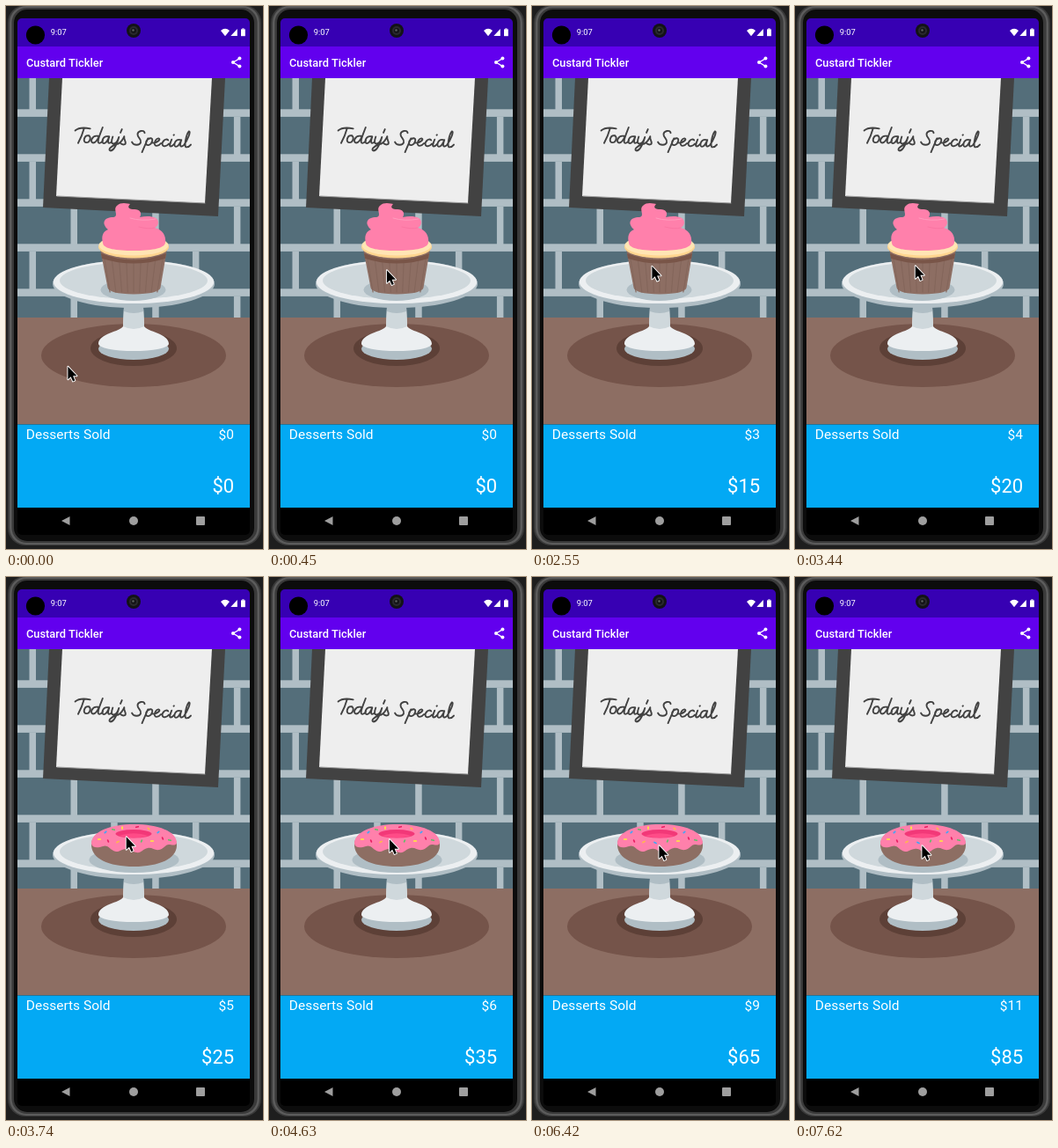
Write an HTML page with a canvas that moves like this. It is 292 px wide and 617 px high and loops after 8 s.

```html
<!DOCTYPE html>
<html lang="en">
<head>
<meta charset="utf-8">
<title>Custard Tickler</title>
<style>
html, body { margin: 0; width: 100%; height: 100%; overflow: hidden; background: #1b1b1b; }
canvas { display: block; width: 292px; height: 617px; }
</style>
</head>
<body>
<canvas id="stage" role="img" aria-label="Phone app: tap the dessert to sell it. Sign: Today's Special"></canvas>
<script>
const W = 292, H = 617, LOOP = 8000;
const canvas = document.getElementById('stage');
const ctx = canvas.getContext('2d');
const ratio = window.devicePixelRatio || 1;
canvas.width = Math.round(W * ratio);
canvas.height = Math.round(H * ratio);

// [time, x, y]
const moves = [
  [0, 69.5, 408.5], [150, 103.5, 322], [300, 130, 304], [450, 133, 299],
  [1350, 135.5, 294.6], [3440, 135.8, 294], [4180, 136, 296],
  [4330, 136, 297], [4780, 137, 298], [4920, 143.5, 304]
];
const sales = [900, 1800, 2550, 3000, 3740, 4630, 5220, 5820, 6420, 7020, 7620];
const DONUT_AT = 5;

function rect(x, y, w, h, color) {
  ctx.fillStyle = color;
  ctx.fillRect(x, y, w, h);
}
function oval(x, y, rx, ry, color) {
  ctx.fillStyle = color;
  ctx.beginPath();
  ctx.ellipse(x, y, rx, ry, 0, 0, Math.PI * 2);
  ctx.fill();
}
function shape(d, color) {
  ctx.fillStyle = color;
  ctx.fill(new Path2D(d));
}
function line(d, color, width) {
  ctx.strokeStyle = color;
  ctx.lineWidth = width;
  ctx.lineCap = ctx.lineJoin = 'round';
  ctx.stroke(new Path2D(d));
}
function round(x, y, w, h, r, color) {
  ctx.fillStyle = color;
  ctx.beginPath();
  ctx.roundRect(x, y, w, h, r);
  ctx.fill();
}
function text(str, x, y, size, align = 'left', weight = 400) {
  ctx.font = `${weight} ${size}px Roboto, Arial, sans-serif`;
  ctx.textAlign = align;
  ctx.fillStyle = '#fff';
  ctx.fillText(str, x, y);
}

function phone() {
  rect(0, 0, W, H, '#1e1e1e');
  round(2, -1, 288, 614, 20, '#3a3a3a');
  round(4, 0, 284, 612, 19, '#5c5c5c');
  round(6.5, 2, 279, 608, 17, '#3a3a3a');
  round(9, 4, 273, 604, 15, '#0c0c0c');
}

function bars() {
  rect(13, 14, 264, 32, '#3700b3');
  rect(13, 46, 264, 36, '#6200ee');
  oval(33.5, 33, 10.6, 10.6, '#000');
  oval(145, 28, 8, 8, '#131316');
  oval(145, 28, 5, 5, '#2a2a2e');
  oval(145, 28, 3, 3, '#141418');
  oval(144.5, 27.5, 1.2, 1.2, '#5d6360');
  text('9:07', 50.8, 33, 9.3);
  shape('M244 28 Q249 23.5 254 28 L249 34.2Z', '#fff');
  shape('M255.3 34 L262.8 34 L262.8 26Z', '#fff');
  rect(267, 26.4, 4.8, 7.8, '#fff');
  rect(268.3, 25.4, 2.2, 1.2, '#fff');
  text('Custard Tickler', 23, 69, 12.8, 'left', 500);
  line('M265.5 59.6 L258 64 L265.5 68.6', '#fff', 1.3);
  for (const [x, y] of [[265.4, 59.6], [258, 64], [265.4, 68.6]]) oval(x, y, 2, 2, '#fff');
}

function wall() {
  rect(13, 82, 264, 272, '#546e7a');
  for (let row = 0; row < 6; row++) {
    const top = 75 + row * 51;
    rect(13, top + 42.3, 264, 8.6, '#b0bec5');
    for (let x = row % 2 ? 73.5 : 26.5; x < 277; x += 92.7) rect(x, top, 7.5, 43, '#b0bec5');
  }
}

function sign() {
  shape('M49 82 H249 L241 239 L42 229Z', '#424242');
  shape('M64 82 H234 L226 224 L57 216Z', '#eee');
  line('M58 216 L226 224', '#9e9e9e', 1);
  ctx.save();
  ctx.translate(77, 154.5);
  ctx.rotate(0.046);
  const letters = [
    'M1 -13 Q6 -18 18 -16 M11 -16 Q9 -7 5 1',
    'M17 -8 C11 -9 10 0 14 0 C19 0 20 -8 16 -8',
    'M27 -8 C20 -9 18 0 22 0 C25 0 27 -4 29 -9 L32 -18 M30 -12 C27 -3 27 0 29 0 Q31 0 33 -3',
    'M39 -8 C32 -9 31 0 34 0 C37 0 39 -5 40 -8 C38 -1 39 1 43 -2',
    'M44 -8 C42 -2 43 0 45 0 C48 0 50 -4 51 -8 C49 0 46 8 42 8 C39 7 42 3 49 0',
    'M54 -17 L52.5 -13',
    'M50 0 Q55 -3 57 -9 C56 -5 61 -2 58 0 Q55 1 53 -1',
    'M80 -14 C79 -18 72 -16 72 -12 C72 -8 77 -7 76 -3 C75 1 68 1 66 -3',
    'M84 -8 L78 8 M82 -4 C84 -9 90 -10 89 -5 C88 0 83 1 82 -2',
    'M90 -3 C96 -4 99 -8 96 -8.5 C92 -8 90 0 94 0 Q97 0 99 -3',
    'M107 -7 C104 -10 99 -4 101 -1 C102 1 106 0 108 -3',
    'M111 -8 Q108 0 110 0 Q112 0 114 -3 M113 -13 l.4 -.4',
    'M121 -8 C114 -9 113 0 116 0 C119 0 121 -5 122 -8 C120 -1 121 1 125 -2',
    'M125 -2 C129 -8 133 -19 130 -18 C127 -14 125 0 128 0 Q131 0 133 -3'
  ];
  line(letters.join(' '), '#424242', 1.9);
  ctx.restore();
}

function stand() {
  rect(13, 354, 264, 121.5, '#8d6e63');
  oval(145, 397, 105, 36, '#75544a');
  oval(145, 389, 49, 20, '#5d4037');
  oval(145, 389.5, 40, 12.5, '#b0bec5');
  shape('M134 342 H156 L157 364 C160 370 185 372 185 384 A40 8 0 0 1 105 384 C105 372 130 370 133 364Z', '#eceff1');
  shape('M134 342 H156 L157 364 Q145 370 133 364Z', '#cfd8dc');
  shape('M134 340 H156 V347 Q145 351 134 347Z', '#b0bec5');
  oval(145, 315.7, 92, 27.3, '#b0bec5');
  oval(145, 313.5, 91.2, 24.6, '#eceff1');
  oval(145, 312, 84, 20.8, '#cfd8dc');
}

function cupcake() {
  oval(144.5, 322.5, 37, 12.5, '#b0bec5');
  shape('M107 276 H183 L175.5 320 Q174 327 145 327.5 Q117 327 115.5 320Z', '#8d6e63');
  for (let i = 0; i < 9; i++) {
    const x = (i - 4) * 8.4;
    line(`M${145 + x} 284 L${145 + x * .8} 325`, '#84665b', 1.2);
  }
  shape('M108 281 Q145 296 182 281 L181 287 Q145 298 109 287Z', '#795548');
  oval(145, 274, 40, 12.5, '#ffd58f');
  oval(145, 272, 39.5, 11.5, '#ffe5b4');
  shape('M110 269 C108 262 110 256 116 254 C108 247 111 240 122 240 ' +
    'C129 239 121 231 126 227 C131 222 139 225 141 225 C137 229 140 231 146 231 ' +
    'C152 231 155 235 152 240 C162 238 173 239 173 246 C173 249 171 251 169 252 ' +
    'C178 254 182 261 181 269 C180 276 163 278 145 278 C126 278 110 276 110 269Z', '#ff80ab');
  line('M141 241 Q154 245 170 242', '#ff9dbe', 1);
  line('M151 251 Q162 254 169 252', '#f973a0', .8);
}

function donut() {
  oval(145.5, 321.5, 51, 14.5, '#b0bec5');
  shape('M97 304 C97 289 119 282 145.5 282 C173 282 194 289 194 305 ' +
    'C194 320 174 329 145.5 329 C116 329 97 320 97 304Z', '#8d6e63');
  shape('M97 303 C97 289 119 281 145.5 281 C173 281 194 289 194 302 ' +
    'C193 306 188 304 185 304 C181 304 179 309 174 310 C169 311 166 307 161 308 ' +
    'C155 309 154 314 148 313 C142 312 142 308 136 309 C129 310 128 314 122 311 ' +
    'C117 308 115 304 110 306 C104 308 98 308 97 303Z', '#ff80ab');
  oval(145, 291.8, 20.5, 4.8, '#f23878');
  shape('M128 294 Q145 288.5 162 294 Q146 298.5 128 294Z', '#ff4b87');
  const dots = [
    [106, 298], [113, 290], [116, 300], [122, 287], [127, 301], [132, 285], [140, 302],
    [149, 284], [154, 300], [162, 286], [166, 300], [173, 290], [178, 297], [186, 299]
  ];
  const colors = ['#ffeb3b', '#42a5f5', '#e91e63', '#66bb6a', '#ffb74d'];
  dots.forEach(([x, y], i) => {
    const a = i * 2.2, dx = Math.cos(a) * 1.3, dy = Math.sin(a) * .9;
    line(`M${x - dx} ${y - dy} L${x + dx} ${y + dy}`, colors[i % 5], 1.7);
  });
}

function panel(sold, money) {
  rect(13, 475.5, 264, 94.5, '#03a9f4');
  text('Desserts Sold', 22.8, 492, 15.5);
  text('$' + sold, 259, 492, 15.5, 'right');
  text('$' + money, 259.2, 553, 22, 'right');
  rect(13, 570, 264, 31, '#000');
  shape('M63 585 L72.5 580 V590Z', '#9e9e9e');
  oval(145, 585, 5, 5, '#9e9e9e');
  round(216, 580, 10, 10, 1, '#9e9e9e');
}

function cursor(x, y) {
  ctx.save();
  ctx.translate(x, y);
  const arrow = 'M.9 1.2 V15.8 L4.2 12.7 L6.6 18 L8.8 17 L6.6 11.8 H11Z';
  line(arrow, '#fff', 1.9);
  shape(arrow, '#000');
  ctx.restore();
}

function draw(t) {
  const sold = sales.filter(s => s <= t).length;
  const money = sold * 5 + Math.max(0, sold - DONUT_AT) * 5;
  const [, x, y] = moves.filter(m => m[0] <= t).pop();
  ctx.setTransform(ratio, 0, 0, ratio, 0, 0);
  phone();
  ctx.save();
  ctx.beginPath();
  ctx.roundRect(13, 14, 264, 587, 5);
  ctx.clip();
  wall();
  sign();
  stand();
  (sold < DONUT_AT ? cupcake : donut)();
  panel(sold, money);
  bars();
  ctx.restore();
  cursor(x, y);
}

const start = performance.now();
function tick() {
  draw((performance.now() - start) % LOOP);
  requestAnimationFrame(tick);
}
tick();
</script>
</body>
</html>
```
